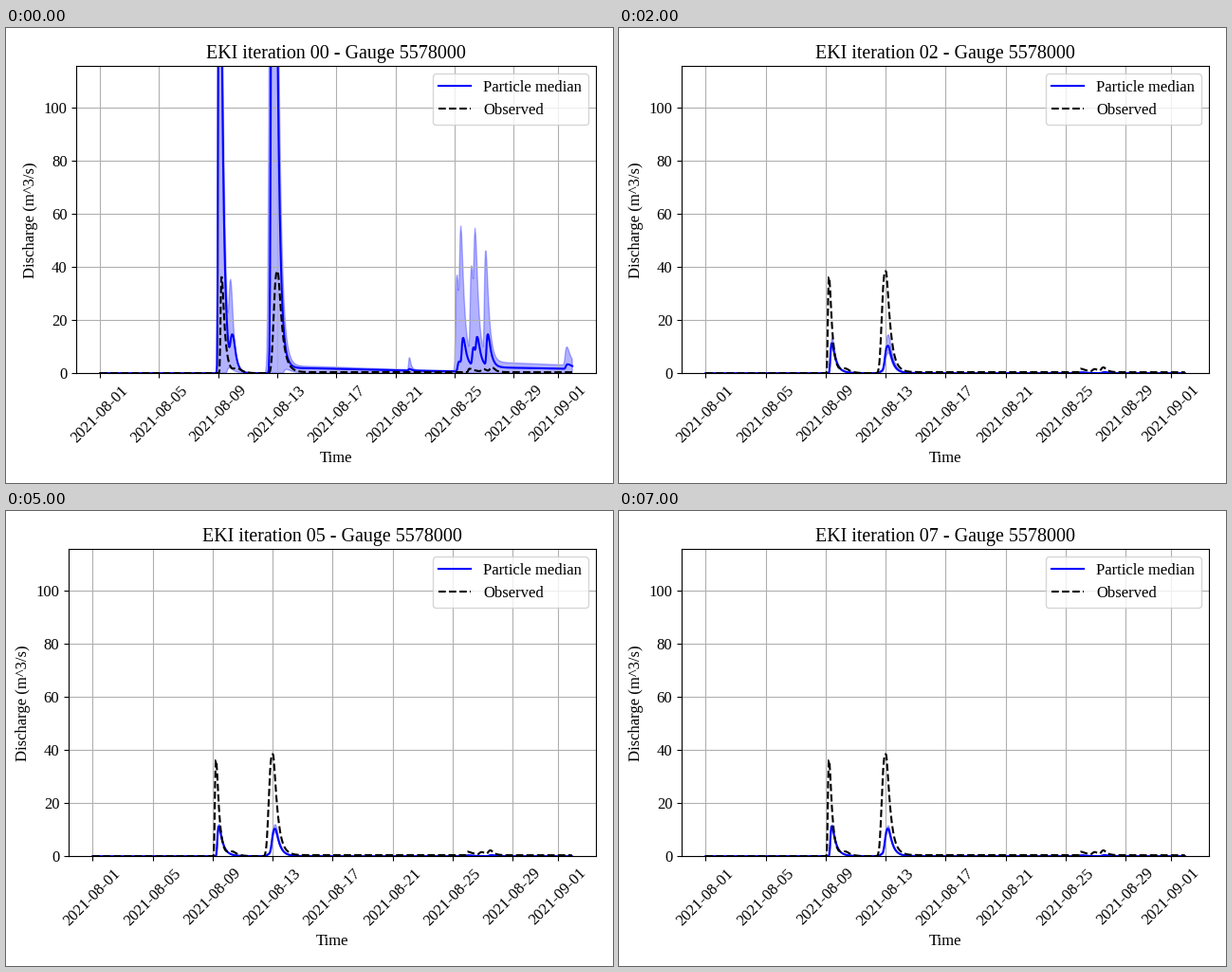
Animation of 640 by 480 pixels, one loop 8000 ms. Source, as a matplotlib script:

```python
import numpy as np
import matplotlib.pyplot as plt
from matplotlib.animation import FuncAnimation

plt.rcParams.update({"font.family": "Liberation Serif", "font.size": 12})

T = np.arange(32 * 24) / 24  # hourly samples, in days
TICKS = [0, 4, 8, 12, 16, 20, 24, 28, 31]
LABELS = [f"2021-08-{d + 1:02d}" for d in TICKS[:-1]] + ["2021-09-01"]
Y_TOP = 115.6


def pulse(day, height, rise, fall):
    """Flood wave: steep rise, rounded crest, exponential recession."""
    s = T - day
    crest = .4 * fall
    up = (np.maximum(-s, 0) / rise) ** 3
    down = (np.hypot(np.maximum(s, 0), crest) - crest) / fall
    return height * np.exp(-up - down)


def flow(*waves):
    return .1 + sum(pulse(*w) for w in waves)


observed = flow(
    (8.23, 36.5, .097, .19), (9.35, 1.6, .4, .3),
    (12.02, 38.4, .33, .27), (13.2, .4, .5, 60),
    (25, 1.3, .1, .4), (25.97, 1, .2, .25), (26.55, 1.6, .2, .2))

# Late rain: day of the crest, height in the upper band and in the median
RAIN = [(24.16, 36, 3.5), (24.44, 40, 10), (25.15, 34, 7),
        (25.41, 35, 8.4), (26.11, 40, 12)]

prior_low = flow((8.75, 2, .15, .3), (12.6, 1.4, .15, .4))

prior_median = flow(
    (8.08, 235, .1, .175), (9, 12.4, .21, .2),
    (11.75, 330, .19, .2), (13, 1.9, .5, 8),
    (20.94, .6, .07, .15), (24.8, 1.7, .4, 15), (31.65, 1.7, .15, .4),
    *[(day + .14, mid, .12, .2) for day, _, mid in RAIN])

prior_high = flow(
    (8.1, 262, .13, .19), (8.87, 27.5, .16, .18),
    (11.75, 434, .29, .22), (13, 2.6, .5, 8),
    (20.94, 4.6, .07, .1), (25, 3.5, .5, 12), (31.6, 6.8, .15, .25),
    *[(day, top, .12, .2) for day, top, _ in RAIN])

# Unit responses to the two storms once the ensemble has been updated
storm1 = pulse(8.41, .95, .117, .2) + pulse(8.7, .1, .3, .45)
storm2 = pulse(12.17, .94, .25, .25) + pulse(11.8, .08, .2, .7)
posterior = flow((25.1, .35, .2, .3), (26.6, .4, .2, .3)) + 11.4 * storm1 + 10.3 * storm2


def ensemble(k):
    if k == 0:
        return prior_low, prior_median, prior_high
    spread = 8.5 / k * (.5 * storm1 + storm2)
    high = posterior + spread
    if k == 1:
        high = np.maximum(observed, posterior)
    return posterior - .6 * spread, posterior, high


fig = plt.figure(figsize=(6.4, 4.8), dpi=100)


def draw(k):
    fig.clf()
    ax = fig.add_subplot()
    low, median, high = ensemble(k)
    ax.fill_between(T, low, high, color="blue", alpha=.3)
    ax.plot(T, median, color="blue", label="Particle median")
    ax.plot(T, observed, "k--", label="Observed")
    ax.set_title(f"EKI iteration {k:02d} - Gauge 5578000", pad=5.75)
    ax.set_xlabel("Time")
    ax.set_ylabel("Discharge (m^3/s)")
    ax.set_xticks(TICKS, LABELS, rotation=45)
    ax.set_xlim(-.05 * T[-1], 1.05 * T[-1])
    ax.grid(True)
    ax.legend(loc="upper right")
    # The margins fit the full data range, before the view is fixed
    ax.set_ylim(0, 400 if k == 0 else 40.5)
    fig.tight_layout()
    ax.set_ylim(0, Y_TOP)
    return []


anim = FuncAnimation(fig, draw, frames=8, interval=1000, init_func=lambda: [],
                     repeat=True, repeat_delay=0)
plt.show()
```
